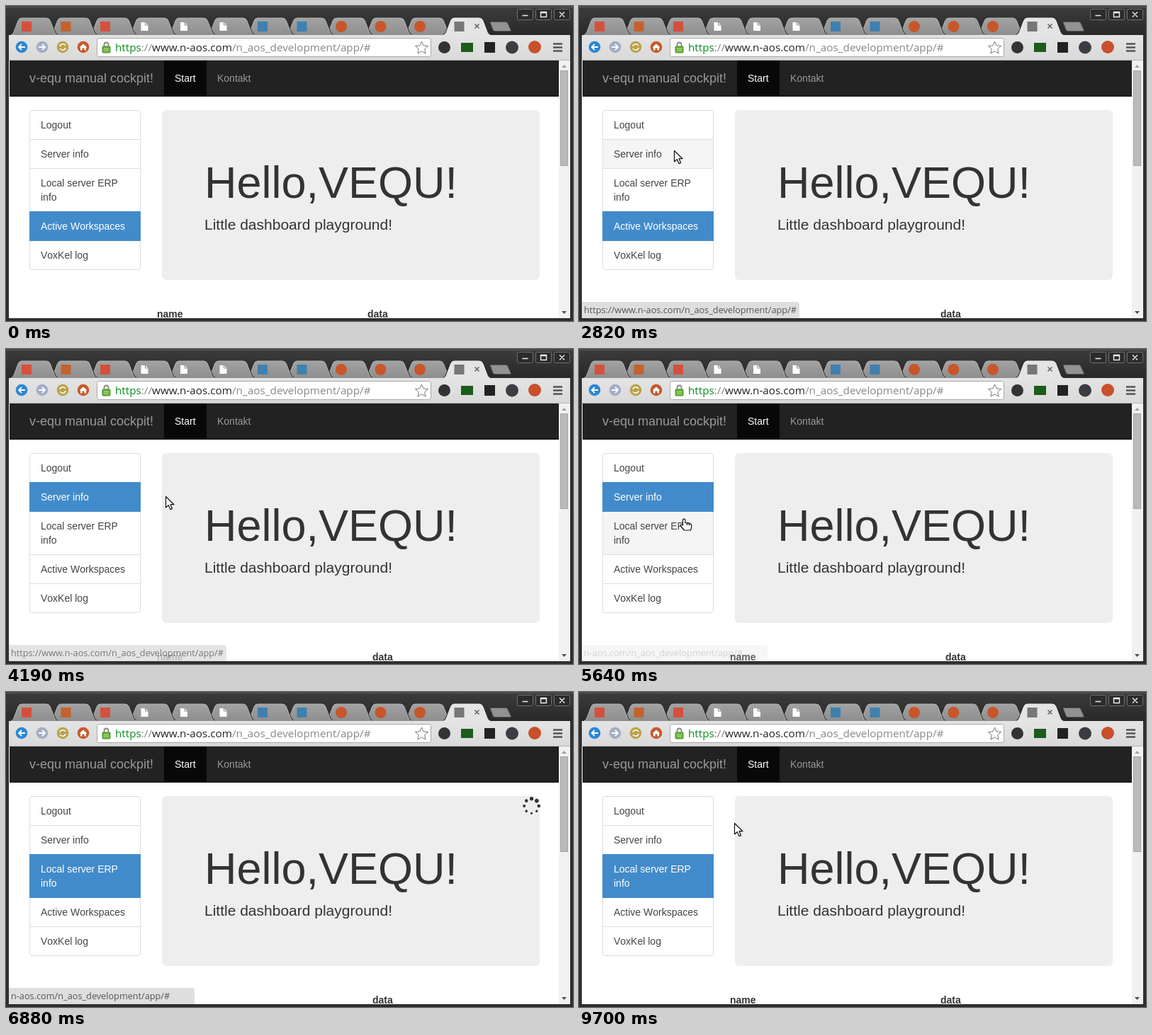
Write an HTML page that moves like this. It is 800x445 px and loops after 9.73 s.

```html
<!DOCTYPE html>
<html lang="en">
<head>
<meta charset="utf-8">
<title>Dashboard</title>
<style>
html, body { margin: 0; width: 100%; height: 100%; overflow: hidden; background: #2e2e2e; }
svg { position: absolute; left: 0; top: 0; width: 800px; height: 445px; }
svg text { font-family: "Open Sans", "Noto Sans", sans-serif; white-space: pre; }
#page {
  position: absolute; left: 4px; top: 77px; width: 776px; height: 364px; overflow: hidden; background: #fff;
  font: 14px/20px "Liberation Sans", Arial, sans-serif; font-kerning: none; color: #333; white-space: nowrap;
}
#page > * { position: absolute; }
nav { left: 1px; width: 775px; height: 50px; background: #222; border-bottom: 1px solid #080808; color: #999; }
nav span { position: absolute; top: 0; padding: 15px; }
#brand { left: 13px; font-size: 18px; }
#start { left: 218px; background: #080808; color: #fff; }
#contact { left: 278px; }
#list { left: 29px; top: 70px; width: 157px; }
.item { position: relative; padding: 10px 15px; margin-bottom: -1px; border: 1px solid #ddd; color: #444; }
.item:first-child { border-radius: 4px 4px 0 0; }
.item:last-child { border-radius: 0 0 4px 4px; }
.item.hover { background: #f5f5f5; }
.item.active { z-index: 1; background: #428bca; border-color: #428bca; color: #fff; }
#hero { left: 216px; top: 70px; width: 533px; height: 240px; border-radius: 6px; background: #eee; }
#hero div { position: absolute; left: 60px; }
#hello { top: 67px; font-size: 63px; line-height: 70px; }
#lead { top: 150px; font-size: 21px; line-height: 23px; }
.head { top: 348px; font-weight: bold; }
</style>
</head>
<body>
<svg viewBox="0 0 800 445">
  <defs>
    <linearGradient id="title" x2="0" y2="1"><stop stop-color="#3c3c3c"/><stop offset="1" stop-color="#292929"/></linearGradient>
    <linearGradient id="tab" x2="0" y2="1"><stop stop-color="#a2a2a2"/><stop offset="1" stop-color="#8e8e8e"/></linearGradient>
    <linearGradient id="bar" x2="0" y2="1"><stop stop-color="#e4e4e4"/><stop offset="1" stop-color="#d9d9d9"/></linearGradient>
  </defs>

  <!-- window -->
  <rect width="800" height="445" fill="#2e2e2e"/>
  <rect width="800" height="41" fill="url(#title)"/>
  <path d="M0 1.5H800" stroke="#5a5a5a"/>
  <g fill="#2b2b2b" stroke="#707070">
    <rect x="721.5" y="4.5" width="22" height="15" rx="2"/>
    <rect x="747.5" y="4.5" width="22" height="15" rx="2"/>
    <rect x="773.5" y="4.5" width="22" height="15" rx="2"/>
    <path d="M728.5 13.5h8M754.5 8.5h8v7h-8zM754 9.5h9M781 8.5l7 7m0-7l-7 7" fill="none" stroke="#eee" stroke-width="1.4"/>
  </g>
  <g id="tabs"></g>
  <path d="M683 22.5h22q2 0 3 2l4 9q1 2-1 2H690q-2 0-3-2z" fill="#929292" stroke="#555"/>
  <path d="M661.5 25.5l6 6m0-6l-6 6" stroke="#666" stroke-width="1.6"/>

  <!-- toolbar -->
  <rect x="4" y="41" width="792" height="36" fill="url(#bar)"/>
  <path d="M4 76.5H796" stroke="#b5b5b5"/>
  <circle cx="22" cy="58" r="8.3" fill="#2b87d3"/>
  <circle cx="51" cy="58" r="8.3" fill="#a3adc6"/>
  <circle cx="80" cy="58" r="8.3" fill="#b9a34c"/>
  <circle cx="109" cy="58" r="8.3" fill="#c55a2b"/>
  <g fill="none" stroke="#fff" stroke-width="1.8">
    <path d="M27 58H18m4-4l-4 4 4 4M46 58h9m-4-4l4 4-4 4"/>
    <path d="M76 57a4.3 4.3 0 0 1 8-1M84 59a4.3 4.3 0 0 1-8 1" stroke-width="1.5"/>
  </g>
  <path d="M103.5 58.5l5.5-5 5.5 5h-1.5v4h-2.5v-3h-3v3h-2.5v-4z" fill="#fff"/>
  <rect x="128.5" y="45.5" width="471" height="26" rx="3" fill="#fff" stroke="#a8a8a8"/>
  <path d="M138.5 58v-3.5a3 3 0 0 1 6 0V58" fill="none" stroke="#888" stroke-width="1.8"/>
  <rect x="136" y="57" width="11" height="9" rx="1" fill="#6cb33a" stroke="#4c8a2c"/>
  <path d="M138 60.5h7m-7 2.5h7" stroke="#b5dd90"/>
  <text x="154" y="64" font-size="15.25" fill="#888"><tspan fill="#0a8a1c">https</tspan>://<tspan fill="#222">www.n-aos.com</tspan>/n_aos_development/app/#</text>
  <path d="M586.5 50l2.6 5.9 6.4.6-4.8 4.3 1.4 6.3-5.6-3.3-5.6 3.3 1.4-6.3-4.8-4.3 6.4-.6z" fill="#fff" stroke="#777"/>
  <circle cx="618.5" cy="58.5" r="8.5" fill="#333"/>
  <rect x="642" y="52" width="17" height="13" fill="#1c5c1c"/>
  <rect x="675" y="51" width="15" height="15" fill="#222"/>
  <circle cx="714" cy="58.5" r="9" fill="#3b3d42"/>
  <circle cx="746" cy="58" r="9" fill="#c8502a"/>
  <path d="M772 53.5h13m-13 5h13m-13 5h13" stroke="#555" stroke-width="2.6"/>
</svg>

<div id="page">
  <nav>
    <span id="brand">v-equ manual cockpit!</span>
    <span id="start">Start</span>
    <span id="contact">Kontakt</span>
  </nav>
  <div id="list">
    <div class="item">Logout</div>
    <div class="item">Server info</div>
    <div class="item">Local server ERP<br>info</div>
    <div class="item">Active Workspaces</div>
    <div class="item">VoxKel log</div>
  </div>
  <div id="hero">
    <div id="hello">Hello,VEQU!</div>
    <div id="lead">Little dashboard playground!</div>
  </div>
  <div class="head" style="left: 209px">name</div>
  <div class="head" id="data">data</div>
</div>

<svg viewBox="0 0 800 445">
  <g id="spinner" fill="#333"></g>
  <rect x="780" y="77" width="16" height="364" fill="#f1f1f1"/>
  <rect x="782.5" y="91.5" width="10" height="134" fill="#bababa" stroke="#a6a6a6"/>
  <path d="M784 87l3.5-4 3.5 4z" fill="#a0a0a0"/>
  <path d="M784 431l3.5 4 3.5-4z" fill="#505050"/>
  <g id="status">
    <path id="pill" fill="#dedede"/>
    <text id="link" x="7" y="434" font-size="12.7" fill="#555"></text>
  </g>
  <g id="cursor" fill="#fff" stroke="#111" stroke-width="1.2" stroke-linejoin="round">
    <path id="arrow" d="M.5.5v15.5l3.7-3.4 2.7 6 2.7-1.2-2.6-5.7h5z"/>
    <g id="hand" transform="translate(-5 -1)">
      <path d="M4.5 2q1.700-1.700 3.400 0v4.500l7 1.300q1.700.5 1.700 2.200v3.500l-1 3.500H6.500L1 10.500q-.3-2 2-1.500l1.500 1.200z"/>
      <path d="M10.500 7.500v2.500m3-2v2.500" fill="none"/>
    </g>
  </g>
</svg>
<script>
const LOOP = 9730;
const $ = id => document.getElementById(id);
const show = (id, on) => $(id).style.display = on ? '' : 'none';

const pageIcon = x => `<path d="M${x - 5} 23h6l4 4v8h-10z" fill="#fff"/><path d="M${x + 1} 23v4h4" fill="none" stroke="#888"/>`;
const square = color => x => `<rect x="${x - 7}" y="22" width="14" height="14" fill="${color}"/>`;
const dot = color => x => `<circle cx="${x}" cy="29" r="8" fill="${color}"/>`;
const mail = square('#d5503c'), rust = square('#c4622c'), blue = square('#3f80b0'), orange = dot('#c8562a');
const icons = [mail, rust, mail, pageIcon, pageIcon, pageIcon, blue, blue, orange, orange, orange, square('#777')];

function tab(icon, i) {
  const x = 7 + 55.5 * i, front = i == icons.length - 1;
  const shape = `d="M${x} 41q3-1 4-4l6-16q1.5-4 5-4h35q4 0 5.5 4l6 16q1 3 4 4"`;
  return `<path ${shape} fill="none" stroke="#303030" stroke-width="3"/>
    <path ${shape} fill="${front ? '#e4e4e4' : 'url(#tab)'}" stroke="${front ? '#eee' : '#b4b4b4'}"/>` + icon(x + 22);
}
// each tab overlaps the next one; the selected tab lies on top
const tabs = icons.map(tab), selected = tabs.pop();
$('tabs').innerHTML = tabs.reverse().join('') + selected;

// dots shrink around the ring, largest first
$('spinner').innerHTML = [2.8, 2.6, 2.3, 2, 1.8, 1.6, 1.6, 2.3].map((r, i) =>
  `<circle cx="10.3" r="${r}" transform="rotate(${-45 * i})"/>`).join('');

// pointer path: time, x, y
const path = [
  [140, 200, 198], [400, 150, 199], [690, 136, 204], [1969, 136, 204], [1970, 135, 204],
  [2819, 135, 204], [2820, 134, 204], [3820, 134, 204], [4010, 200, 207], [4160, 225, 208],
  [5160, 225, 208], [5480, 186, 225], [5640, 147, 240], [6040, 160, 234], [6880, 160, 234],
  [7000, 168, 230], [7440, 263, 181], [9259, 263, 181], [9260, 262, 181], [9410, 262, 181], [9700, 219, 185]
];
function pointer(t) {
  const i = path.findIndex(p => p[0] > t);
  if (i < 1) return path.at(i).slice(1);
  const [t0, x0, y0] = path[i - 1], [t1, x1, y1] = path[i], k = (t - t0) / (t1 - t0);
  return [x0 + (x1 - x0) * k, y0 + (y1 - y0) * k].map(Math.round);
}
const ramp = (t, a, b) => Math.min(1, Math.max(0, (t - a) / (b - a)));

const items = [...$('list').children];
const edges = [147, 188, 229, 290, 331, 372];

function draw(t) {
  const [x, y] = pointer(t), over = x >= 33 && x < 190;
  const active = t < 2860 ? 3 : t < 6320 ? 1 : 2;
  items.forEach((item, i) => {
    const hover = t >= 140 && over && y >= edges[i] && y < edges[i + 1];
    item.className = 'item' + (i == active ? ' active' : hover ? ' hover' : '');
  });

  show('cursor', t >= 140);
  $('cursor').setAttribute('transform', `translate(${x} ${y})`);
  const hand = over && (t < 2820 || t > 5180);
  show('hand', hand);
  show('arrow', !hand);

  show('spinner', t >= 2860 && t < 3820 || t >= 6320 && t < 7320);
  $('spinner').setAttribute('transform', `translate(741.5 161) rotate(${(t - 6880) * .18 - 45})`);
  $('data').style.left = (t >= 3820 && t < 7320 ? 513 : 506) + 'px';

  const second = t > 5000;
  $('status').style.opacity = second
    ? ramp(t, 5600, 5760) - ramp(t, 7280, 7460)
    : ramp(t, 190, 310) - ramp(t, 4150, 4350);
  const grow = second ? ramp(t, 7100, 7160) : ramp(t, 1740, 1800);
  $('pill').setAttribute('d', `M4 418H${262 + 45 * grow}q4 0 4 4V441H4z`);
  $('link').textContent = (grow == 1 ? 'https://www.' : '') + 'n-aos.com/n_aos_development/app/#';
}

function tick() {
  draw(performance.now() % LOOP);
  requestAnimationFrame(tick);
}
tick();
</script>
</body>
</html>
```
